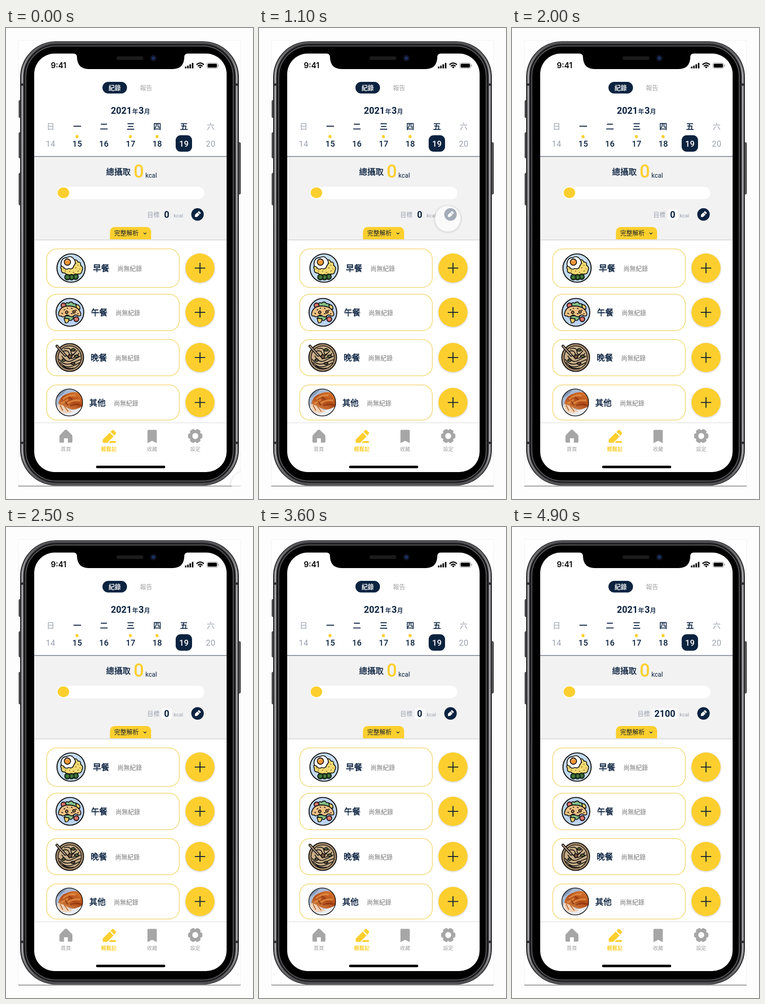
Recreate the animation shown at these times as an HTML page. Size 543 by 1032 pixels, loop 5000 ms.

```html
<!DOCTYPE html>
<html lang="zh-Hant">
<head>
<meta charset="utf-8">
<title>飲食紀錄</title>
<style>
  html, body { margin: 0; width: 100%; height: 100%; overflow: hidden; background: #fdfdfd; }
  svg { display: block; width: 543px; height: 1032px; }
  text { font-family: Roboto, 'Noto Sans CJK TC', 'Noto Sans CJK JP', sans-serif; font-size: 13.5px; fill: #0c2340; }
  .mid { text-anchor: middle; }
  .med { font-weight: 500; stroke: #0c2340; stroke-width: .35; }
  .bold { font-weight: 700; font-size: 20px; }
  .dim { fill: #9aa1ae; }
  .day { font-size: 17.5px; font-weight: 500; text-anchor: middle; }
  .day.dim { font-weight: 400; }
  .day.med { stroke-width: .6; }
  .meal { font-size: 18px; font-weight: 500; stroke: #0c2340; stroke-width: .6; }
  .note { fill: #777; }
  .tab { font-size: 11.3px; fill: #a0a0a0; text-anchor: middle; }
  .ink { stroke: #111; stroke-width: 1.8; stroke-linejoin: round; stroke-linecap: round; }
  #touch { animation: move 5s infinite linear; }
  #halo { animation: lift 5s infinite linear; }
  #disc { animation: press 5s infinite linear; }
  @keyframes move {
    0%   { transform: translate(523px, 1000px); animation-timing-function: ease-in; }
    4%   { transform: translate(507px, 895px); }
    8%   { transform: translate(486px, 760px); }
    12%  { transform: translate(456px, 580px); animation-timing-function: ease-out; }
    20%  { transform: translate(415px, 417px); }
    23%  { transform: translate(415px, 417px); animation-timing-function: ease-in-out; }
    30%, 100% { transform: translate(418px, 405px); }
  }
  @keyframes lift {
    0%, 25% { opacity: .55; }
    31%, 100% { opacity: 0; }
  }
  @keyframes press {
    0%, 25% { opacity: .62; }
    31%, 33% { opacity: .4; }
    38%, 100% { opacity: 0; }
  }
</style>
</head>
<body>
<svg viewBox="0 0 543 1032">
  <defs>
    <linearGradient id="steel" x2="0" y2="1">
      <stop offset="0" stop-color="#4a4a4d"/><stop offset=".07" stop-color="#a4a4a6"/>
      <stop offset=".5" stop-color="#98989a"/><stop offset=".93" stop-color="#a4a4a6"/>
      <stop offset="1" stop-color="#4a4a4d"/>
    </linearGradient>
    <linearGradient id="fade" x2="0" y2="1">
      <stop offset="0" stop-color="#000" stop-opacity=".16"/><stop offset="1" stop-color="#000" stop-opacity="0"/>
    </linearGradient>
    <linearGradient id="roast" x1=".8" x2=".2" y2="1">
      <stop offset="0" stop-color="#d9782e"/><stop offset=".5" stop-color="#b04a18"/><stop offset="1" stop-color="#d98a48"/>
    </linearGradient>
    <radialGradient id="glow">
      <stop offset=".84" stop-color="#000" stop-opacity="0"/><stop offset=".86" stop-color="#000" stop-opacity=".17"/>
      <stop offset="1" stop-color="#000" stop-opacity="0"/>
    </radialGradient>
    <clipPath id="area"><rect x="27" y="27" width="489" height="978"/></clipPath>
    <clipPath id="plate"><circle r="30"/></clipPath>
    <g id="add">
      <circle r="35" cy="1" fill="url(#glow)"/>
      <circle r="32" fill="#fccf2e"/>
      <path d="M-11.500 0H11.500M0-11.500V11.500" stroke="#14202f" stroke-width="2.200"/>
    </g>
    <g id="cucumber">
      <circle r="6" fill="#2f6b32" class="ink"/><circle r="3" fill="#6aa653" stroke="#173a1a"/>
      <circle r="1" fill="#173a1a"/>
    </g>
    <g id="tomato">
      <circle r="5.500" fill="#c9605a" class="ink"/><path d="M-2 1l1-3M1 2l1-3" stroke="#f0b3a6" stroke-width="1.300"/>
    </g>
  </defs>

  <!-- backdrop and phone body -->
  <rect x="27" y="27" width="489" height="977" fill="#fff"/>
  <path d="M27 27.500H516M27.500 27V1003M515.500 27V1003" stroke="#f0f0f0" fill="none"/>
  <path d="M27 1003.700H516" stroke="#5d5d5d" stroke-width="1.200"/>
  <g fill="#5a5a5d" stroke="#1c1c1c">
    <rect x="28.500" y="158.500" width="6" height="38" rx="2"/>
    <rect x="28.500" y="229" width="6" height="56" rx="2"/>
    <rect x="28.500" y="318" width="6" height="70" rx="2"/>
    <rect x="508.500" y="251" width="7" height="113" rx="2"/>
  </g>
  <rect x="31" y="29" width="481" height="973.500" rx="79" fill="#1b1b1d"/>
  <rect x="35.500" y="32.500" width="472" height="966.500" rx="75" fill="none" stroke="url(#steel)" stroke-width="5"/>
  <rect x="33.500" y="31" width="476" height="969.500" rx="77" fill="none" stroke="#626265" stroke-width="1.500"/>
  <rect x="39" y="36" width="465" height="960" rx="72" fill="#1c1c1e"/>
  <rect x="43.500" y="39.500" width="456" height="953" rx="67" fill="#000" stroke="#5c5c5f" stroke-width="2"/>
  <path d="M32 124H40M503 124H511M32 909H40M503 909H511" stroke="#2c2c2e" stroke-width="5"/>
  <rect x="62" y="56" width="423" height="917" rx="45" fill="#fff"/>
  <path d="M148 55V56Q156 56 156 64Q157 90 182 90H366Q391 90 392 64Q392 56 400 56V55Z"/>
  <rect x="243" y="62" width="59" height="8" rx="4" fill="#1b1b1c"/>
  <circle cx="324" cy="66" r="7" fill="#101424"/><circle cx="324" cy="66" r="3.500" fill="#1b3165"/>

  <!-- status bar -->
  <text x="98.500" y="88" style="font:600 17px Inter,sans-serif;fill:#000">9:41</text>
  <path d="M395 88.500V84.500M400 88.500V82.500M405 88.500V79.500M410.300 88.500V76.500" stroke="#000" stroke-width="3.300"/>
  <g fill="none" stroke="#000" stroke-width="2.500">
    <path d="M418.800 80.500Q427 73 435 80.500M421.800 83.800Q427 79 432 83.800"/>
    <path d="M424.500 85.500Q427 83.700 429.500 85.500L427 88.300Z" fill="#000" stroke-width=".6"/>
  </g>
  <rect x="441.500" y="76.500" width="24" height="12" rx="3.500" fill="none" stroke="#999"/>
  <rect x="443.300" y="78.300" width="20.400" height="8.400" rx="2"/>
  <path d="M467.500 80.500V84.500" stroke="#999" stroke-width="1.500"/>

  <!-- header and week -->
  <rect x="212" y="118" width="54" height="25.500" rx="12.700" fill="#0c2340"/>
  <text class="mid med" x="239" y="136" style="fill:#fff;stroke:#fff">紀錄</text>
  <text class="mid" x="308" y="136" style="fill:#a5a5a5">報告</text>
  <text class="bold" x="230.500" y="188">2021</text>
  <text class="med" x="277.500" y="186.500" style="font-size:13px">年</text>
  <text class="bold" x="291.500" y="188">3</text>
  <text class="med" x="303.500" y="186.500" style="font-size:13px">月</text>
  <g id="week"></g>

  <!-- summary panel -->
  <rect x="62" y="282" width="423" height="181" fill="#f2f2f2"/>
  <path d="M62 281.500H485" stroke="#666d7d" stroke-width="1.600"/>
  <rect x="62" y="463" width="423" height="4" fill="url(#fade)"/>
  <text class="med" x="220" y="322" style="font-size:18px">總攝取</text>
  <text x="280.500" y="328" style="font-size:40px;font-weight:500;fill:#fccf2e">0</text>
  <text x="306.500" y="328" style="font-size:14px">kcal</text>
  <rect x="112" y="348" width="324" height="27" rx="13.500" fill="#fff"/>
  <ellipse cx="126.200" cy="361" rx="12.700" ry="11.800" fill="#fccf2e"/>
  <text class="dim" id="label" x="310.500" y="414">目標</text>
  <rect id="field" y="397.500" height="23" rx="4" fill="#fff"/>
  <text class="bold" id="goal" x="359" y="416" text-anchor="end">0</text>
  <text class="dim" x="368.500" y="415" style="font-size:11.500px">kcal</text>
  <circle cx="421" cy="408.500" r="13.700" fill="#0c2340"/>
  <g transform="translate(421 408.500) rotate(-45)" fill="#fff">
    <path d="M-8 0L-4.500-3.300H3V3.300H-4.500Z"/><rect x="4" y="-3.300" width="3.600" height="6.600" rx="1.200"/>
  </g>
  <path d="M228.500 463V448Q228.500 436 240.500 436H307Q319 436 319 448V463Z" fill="#fccf2e"/>
  <text x="237.700" y="454" style="fill:#17202c">完整解析</text>
  <path d="M302.500 448.500L305.500 451.500L308.500 448.500" fill="none" stroke="#0c2340" stroke-width="1.400"/>

  <g id="meals"></g>

  <!-- breakfast -->
  <g transform="translate(143 526)">
    <circle r="31" fill="#c3daef" class="ink" style="stroke-width:2.200"/>
    <path class="ink" fill="#f3da72" d="M4-17Q12-21 15-13Q22-14 21-6Q28-1 24 6Q23 14 15 13Q9 18 1 14Q-9 17-13 11Q-23 11-21 3Q-25-3-19-7Q-12-14 4-17Z"/>
    <path d="M9 0l3-1M14-7l2 2M14 7l3-1M-14 6l3 1M-4 8l2-2M9-11l3 1M19 1l1 2M-18 1l2 1M4 9l3 1" stroke="#80651a" stroke-width="1.500"/>
    <path class="ink" fill="#fff" d="M-22-10Q-21-23-9-23Q0-28 6-20Q13-12 6-5Q4 4-5 1Q-13 5-16-2Q-23-3-22-10Z"/>
    <circle cx="-8" cy="-13" r="7" fill="#ee9436" class="ink"/><path d="M-11-15Q-10-18-7-17" stroke="#fff" fill="none"/>
    <use href="#cucumber" x="10" y="19"/><use href="#cucumber" x="1" y="20"/><use href="#cucumber" x="-8" y="20"/>
  </g>

  <!-- lunch -->
  <g transform="translate(140.500 623)">
    <circle r="30.500" fill="#bcd3f2" class="ink" style="stroke-width:2.200"/>
    <path class="ink" fill="#83bd86" d="M-11-13Q-10-24-3-20Q3-26 8-19Q16-20 16-12L20-5L-18-3ZM-12 8Q-9 19-3 16Q2 20 6 15L9 7Z"/>
    <use href="#tomato" x="-14" y="-15"/><use href="#tomato" x="14" y="15"/>
    <path class="ink" fill="#efcf68" d="M13-17Q23-17 22-7L15-7ZM-13 13L-2 14Q-2 24-10 23Z"/>
    <path class="ink" fill="#ecc083" d="M-25 3Q-22-14-2-14Q20-13 24 3Q25 9 18 8Q14 4 9 7Q5 12-1 8Q-6 4-10 8Q-17 12-19 8Q-26 9-25 3Z"/>
    <path d="M-13-5l2-1M3-9l2 1M13-5l1 1M-5-9l-1 0M-18 2l2 1M3 3l2 0M17 3l1 0" class="ink"/>
    <g class="ink" fill="#b9804c"><circle cx="-7" cy="0" r="2.800"/><circle cx="9" cy="-1" r="2.800"/></g>
  </g>

  <!-- dinner -->
  <g transform="translate(140 722)">
    <circle r="30.500" fill="#a98d6c" class="ink" style="stroke-width:2.200"/>
    <circle r="25.500" fill="#c9ae88" class="ink" style="stroke-width:1.600"/>
    <g fill="none" class="ink">
      <path d="M-23 4Q-12 20 6 12T23 5M-21 11Q-9 26 8 18T20 12M-15 18Q-5 27 8 23M-17-3Q-8 13 4 7T23-3M-8-6Q-1 5 8 1T20-9"/>
      <path d="M-12-19Q2-24 3-12T16-15M-14-14Q-3-17-1-8T10-8"/>
    </g>
    <path class="ink" fill="#65703f" d="M2-16Q8-23 13-16Q8-12 2-16ZM10-3Q17-9 20-2Q15 3 10-3ZM-18 6Q-13 0-9 6Q-13 11-18 6Z"/>
    <path class="ink" fill="#77543a" d="M-4-3Q0-9 5-4Q5 2-1 3ZM2 13Q8 8 12 13Q8 18 2 13Z"/>
    <path d="M-28-25L-10-5" stroke="#111" stroke-width="6" stroke-linecap="round"/>
    <path d="M-28-25L-10-5" stroke="#c1a58b" stroke-width="2.500" stroke-linecap="round"/>
  </g>

  <!-- other -->
  <g transform="translate(139 820.500)">
    <g clip-path="url(#plate)">
      <rect x="-30" y="-30" width="60" height="60" fill="#a9bad3"/>
      <path d="M-30-8Q-14-16-4-30H-30Z" fill="#8196b5"/>
      <path d="M-24 2Q-20-14-5-19Q14-28 30-16V10Q18 20 2 14Q-14 10-24 2Z" fill="url(#roast)"/>
      <path d="M-14-7Q0-18 14-15M-4 2Q10-7 24-4M-17 2Q-8-2-3-7" stroke="#eb9a4c" stroke-width="4" fill="none" opacity=".65"/>
      <path d="M2 7Q14 2 26 6M-1-12L7-6M-9-3L-3 6" stroke="#7d2c0d" stroke-width="3" fill="none" opacity=".6"/>
      <path d="M-30 6Q0 26 30 8V30H-30Z" fill="#e9edf3"/>
      <path d="M-27 4Q-16 4-4 12L8 20Q-8 27-20 20Z" fill="#f0d3bb"/>
      <path d="M-20 6L-14 18M-11 8L-2 20" stroke="#b7672f" stroke-width="2"/>
    </g>
    <circle r="29.500" fill="none" class="ink" style="stroke-width:1.500"/>
  </g>

  <!-- bottom navigation -->
  <path d="M62 865H485" stroke="#e3e3e3" stroke-width="1.500"/>
  <g fill="#a6a6a6">
    <path d="M131.500 880Q133 880 134 881L145 891.500Q146 893 146 895V906Q146 908.500 143.500 908.500H136V899H127.500V908.500H120Q117.500 908.500 117.500 906V895Q117.500 893 119 891.500L129 881Q130 880 131.500 880Z"/>
    <path d="M311 883Q311 880.500 313.500 880.500H329Q331.500 880.500 331.500 883V909.500L321.200 904.500L311 909.500Z"/>
    <g transform="translate(416 894) rotate(30)">
      <circle r="13"/>
      <rect id="tooth" x="-5.800" y="-15.700" width="11.600" height="31.400" rx="4"/>
      <use href="#tooth" transform="rotate(60)"/><use href="#tooth" transform="rotate(-60)"/>
      <circle r="6.500" fill="#fff"/>
    </g>
  </g>
  <g fill="#fccf2e">
    <path d="M213 901.500L228 886.500L236.500 895L222.500 909H214.500Q212.500 909 212.500 907V903Q212.500 902 213 901.500Z"/>
    <path d="M229.700 884.800L233 881.500Q235 879.500 237 881.500L241 885.500Q243 887.500 241 889.500L238.200 893.300Z"/>
    <path d="M229.500 905H241.500V909H225.500Z"/>
  </g>
  <text class="tab" x="131.500" y="927">首頁</text>
  <text class="tab" x="226" y="927" style="fill:#fccf2e;stroke:#fccf2e;stroke-width:.35">輕鬆記</text>
  <text class="tab" x="321" y="927">收藏</text>
  <text class="tab" x="416" y="927">設定</text>
  <rect x="198" y="959" width="152" height="5.500" rx="2.700"/>

  <g clip-path="url(#area)">
    <g id="touch">
      <circle id="halo" cy="1.500" r="33" fill="url(#glow)"/>
      <circle id="disc" r="28" fill="#fff"/>
    </g>
  </g>
</svg>
<script>
  const el = id => document.getElementById(id);
  const navy = '#0c2340', yellow = '#fccf2e';

  el('week').innerHTML = [...'日一二三四五六'].map((name, i) => {
    const x = 98 + i * 58.65;
    const tone = i % 6 ? 'day' : 'day dim';
    const dot = [1, 3, 4].includes(i) ? `<circle cx="${x - .5}" cy="238" r="3.400" fill="${yellow}"/>` : '';
    const pick = i === 5 ? `<rect x="${x - 18.25}" y="235" width="36" height="36" rx="11" fill="${navy}"/>` : '';
    return `${dot}${pick}<text class="${tone}${i % 6 ? ' med' : ''}" x="${x}" y="221.500">${name}</text>
      <text class="${tone}" x="${x}" y="259.500" style="font-size:18px;letter-spacing:.3px${pick && ';fill:#fff'}">${14 + i}</text>`;
  }).join('');

  // name, card top, card height, title x, button y
  const meals = [
    ['早餐', 484, 84.5, 191, 526],
    ['午餐', 583.2, 80, 187, 623],
    ['晚餐', 682.5, 79.5, 186, 722],
    ['其他', 782, 77, 183, 820.5]
  ];
  el('meals').innerHTML = meals.map(([name, top, h, x, y]) => `
    <rect x="89.500" y="${top}" width="291.500" height="${h}" rx="22" fill="#fff" stroke="#f1d66c" stroke-width="1.500"/>
    <text class="meal" x="${x}" y="${y + 7}">${name}</text>
    <text class="note" x="${x + 54}" y="${y + 6}">尚無紀錄</text>
    <use href="#add" x="426.500" y="${y}"/>`).join('');

  const digit = 11.5, right = 359;
  let start;
  function draw(now) {
    start ??= now;
    const t = (now - start) % 5000;
    const typed = Math.floor((t - 3600) / 100);
    const value = typed > 0 ? '2100'.slice(0, typed) : '0';
    const left = right - digit * value.length;
    el('goal').textContent = value;
    el('label').setAttribute('x', left - 37);
    el('field').setAttribute('x', left - 4.5);
    el('field').setAttribute('width', digit * value.length + 9.5);
    el('field').style.opacity = t < 1900 ? 0 : 1;
    requestAnimationFrame(draw);
  }
  requestAnimationFrame(draw);
</script>
</body>
</html>
```
